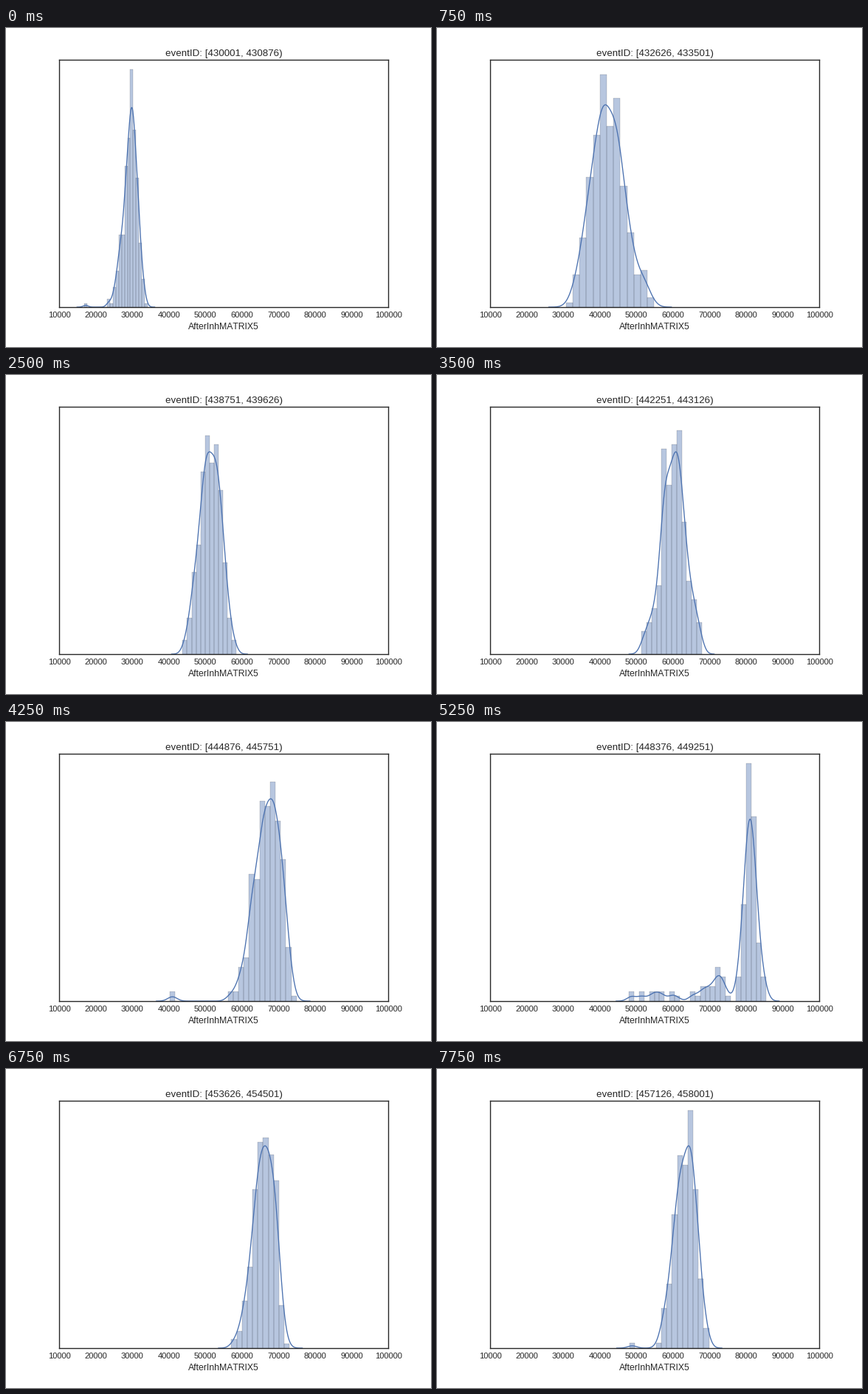
Animation, 576 px wide and 432 px high, one loop 8000 ms. Source, as a matplotlib script:

```python
import numpy as np
import matplotlib.pyplot as plt
from matplotlib.animation import FuncAnimation

W, H, DPI = 576, 432, 80
LEFT, RIGHT, TOP, BOTTOM = 72, 518.4, 43.2, 378
FRAMES, INTERVAL = 32, 250
BLUE, INK = "#4c72b0", "#262626"
PEAK, COUNT = 274, 6.5  # curve height and height of one count, in px

plt.rcParams["font.family"] = "Liberation Sans"
plt.rcParams["text.kerning_factor"] = 6

# Key shapes of the bell: step, centre, left and right spread, bar width (px)
KEYS = np.array([
    (0, 171, 11, 8, 3.9),
    (6, 280, 28, 45, 14.8),
    (10, 281, 16, 12, 6),
    (17, 360, 21, 13, 7.3),
    (21, 423, 7, 9, 6.9),
    (24, 362, 19, 13, 7),
    (31, 340, 17, 11, 7),
])

# Side bumps: step, centre, height, spread
BUMPS = [
    (0, 110, 6, 4), (6, 418, 70, 11), (13, 190, 7, 4), (17, 226, 14, 4),
    (20, 148, 7, 4), (21, 377, 38, 11), (21, 322, 8, 62), (22, 476, 14, 5),
    (31, 265, 9, 4),
]


def bell(x, centre, left, right):
    return np.exp(-((x - centre) / np.where(x < centre, left, right)) ** 2 / 2)


def smooth(lo, hi, bw, heights, parts=8):
    """Gaussian density of the bars, drawn three kernel widths past them."""
    n = len(heights) * parts
    dx = (hi - lo) / n
    points = lo + dx * (np.arange(n) + 0.5)
    weights = np.repeat(heights, parts) * dx
    x = np.linspace(lo - 3 * bw, hi + 3 * bw, 250)
    z = (x[:, None] - points) / bw
    return x, np.exp(-z * z / 2) @ weights / (bw * np.sqrt(2 * np.pi))


def histogram(i):
    """Bar edges, bar heights and density curve of one step."""
    rng = np.random.default_rng(i)
    centre, left, right, width = (
        np.interp(i, KEYS[:, 0], col) for col in KEYS.T[1:])
    bumps = [b[1:] for b in BUMPS if b[0] == i]
    lo = min([centre - 2.6 * left] + [c - s for c, _, s in bumps])
    hi = max([centre + 2.6 * right] + [c + s for c, _, s in bumps])

    edges = np.linspace(lo, hi, round((hi - lo) / width) + 1)
    mid = (edges[1:] + edges[:-1]) / 2
    expected = 300 * bell(mid, centre, left, right)
    for c, height, s in bumps:
        expected += height * bell(mid, c, s, s)
    counts = rng.poisson(expected / COUNT)
    counts[[0, -1]] = np.maximum(counts[[0, -1]], 1)

    x, y = smooth(lo, hi, 0.83 * width, counts)
    scale = min(PEAK / y.max(), 322 / counts.max())
    return edges, counts * scale, x, y * scale


fig = plt.figure(figsize=(W / DPI, H / DPI), dpi=DPI, facecolor="white")
ax = fig.add_axes([LEFT / W, 1 - BOTTOM / H,
                   (RIGHT - LEFT) / W, (BOTTOM - TOP) / H])
ax.set_xlim(LEFT, RIGHT)
ax.set_ylim(0, BOTTOM - TOP)
ax.set_xticks(np.linspace(LEFT, RIGHT, 10),
              [str(v) for v in range(10000, 100001, 10000)])
ax.set_yticks([])
ax.tick_params(length=0, pad=5, labelsize=10, labelcolor=INK)
for spine in ax.spines.values():
    spine.set(color=INK, linewidth=1.25)


def caption(y, size, text=""):
    return fig.text((LEFT + RIGHT) / 2 / W, 1 - y / H, text, fontsize=size,
                    color=INK, ha="center", va="baseline")


title = caption(38, 12)
caption(408, 11, "AfterInhMATRIX5")
curve, = ax.plot([], [], color=BLUE, linewidth=1.2)
bars = []


def draw(i):
    edges, heights, x, y = histogram(i)
    for bar in bars:
        bar.remove()
    bars[:] = ax.bar(edges[:-1], heights, np.diff(edges), align="edge",
                     color=BLUE, edgecolor="black", linewidth=0.3, alpha=0.4)
    curve.set_data(x, y)
    start = 430001 + 875 * i
    title.set_text(f"eventID: [{start}, {start + 875})")
    return [*bars, curve, title]


anim = FuncAnimation(fig, draw, frames=FRAMES, interval=INTERVAL,
                     init_func=lambda: draw(0), repeat=True, repeat_delay=0)
plt.show()
```
